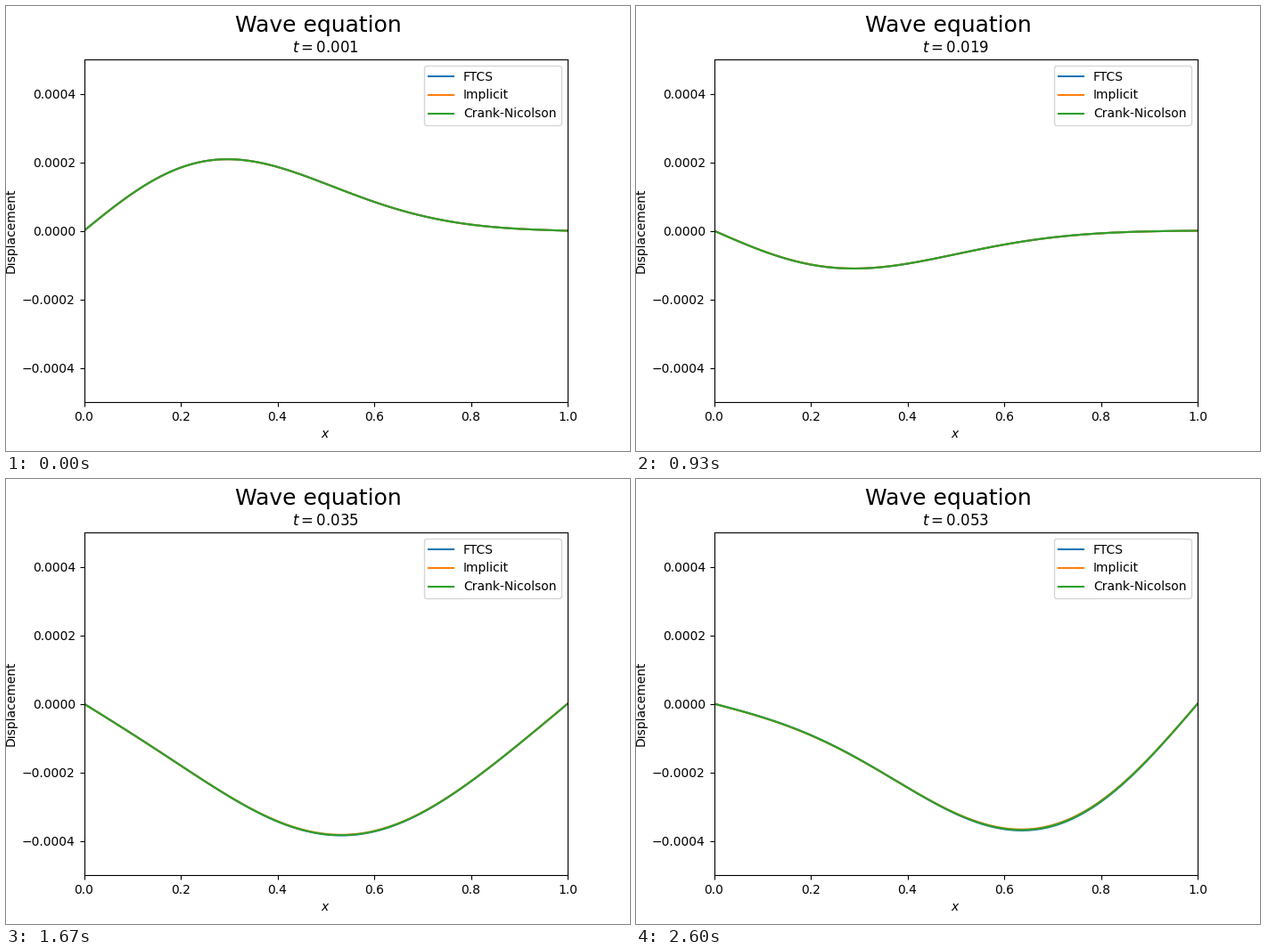
Recreate the animation shown at these times as a matplotlib script. Size 700x500 px, loop 2.63 s.

```python
import numpy as np
import matplotlib.pyplot as plt
from matplotlib.animation import FuncAnimation

FRAMES = 79
LOOP_MS = 2630
SPEED = 100.0       # wave speed
STEP = 1e-6         # integration step, sets the numerical gain or loss
DT = 1 / 1500       # simulated time between frames

# Struck string of unit length: flat at first, with a lopsided velocity bump
x = np.linspace(0, 1, 101)
velocity = x * (1 - x) * np.exp(-(x - 0.1) ** 2 / (2 * 0.3 ** 2))

modes = np.arange(1, 31)
omega = np.pi * SPEED * modes
shapes = np.sin(np.pi * np.outer(x, modes))
amps = 2 * (velocity @ shapes) * (x[1] - x[0]) / omega


def displacement(t, growth):
    """Sum of modes; growth is +1 for explicit, -1 for implicit, 0 for neutral."""
    gain = np.exp(growth * omega ** 2 * STEP * t / 2)
    return shapes @ (amps * gain * np.sin(omega * t))


plt.rcParams["font.family"] = "DejaVu Sans"
fig, ax = plt.subplots(figsize=(7, 5), dpi=100)
fig.suptitle("Wave equation", fontsize=18)
title = ax.set_title("")
ax.set_xlim(0, 1)
ax.set_ylim(-0.0005, 0.0005)
ax.set_xlabel("$x$")
ax.set_ylabel("Displacement")

schemes = {"FTCS": 1, "Implicit": -1, "Crank-Nicolson": 0}
lines = [ax.plot(x, 0 * x, label=name)[0] for name in schemes]
ax.legend(loc="upper right")


def update(i):
    t = (i + 2) * DT
    for line, growth in zip(lines, schemes.values()):
        line.set_ydata(displacement(t, growth))
    title.set_text(f"$t = {t:.3f}$")
    return [*lines, title]


anim = FuncAnimation(fig, update, frames=FRAMES, interval=LOOP_MS / FRAMES,
                     repeat=True, repeat_delay=0)
plt.show()
```
